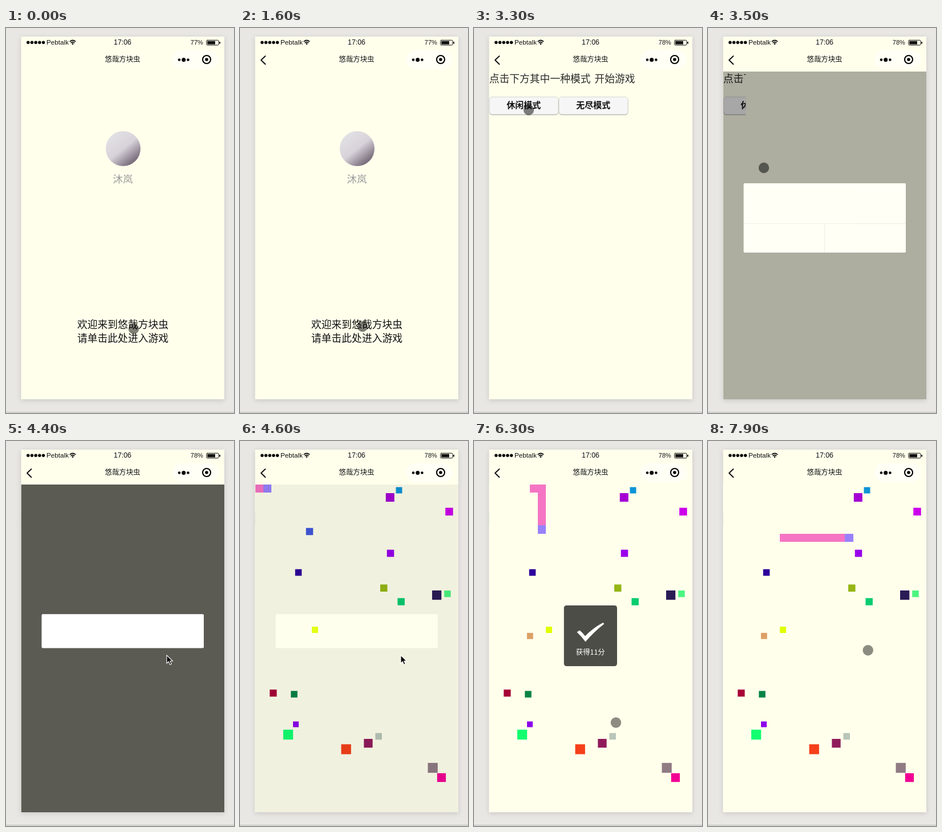
Animation of 400 by 672 pixels, one loop 8000 ms. Source, as an HTML page:

```html
<!DOCTYPE html>
<html lang="zh">
<head>
<meta charset="utf-8">
<title>悠哉方块虫</title>
<style>
  html, body { margin: 0; width: 100%; height: 100%; overflow: hidden; background: #e8e7e4; }
  svg { display: block; width: 400px; height: 672px; }
  text { font-family: "Noto Sans CJK SC", "Noto Sans CJK", sans-serif; fill: #111; }
  .latin { font-family: "Liberation Sans", Arial, sans-serif; }
  .mid { text-anchor: middle; }
  .page { fill: #ffffec; }
  .body { font-size: 17.8px; }
  .prompt { fill: #2b2b28; word-spacing: 3px; }
  .label { font-size: 15px; font-weight: 700; }
  .button { fill: #f6f6f6; stroke: #d0d0cc; stroke-width: .8; filter: drop-shadow(0 1px .6px #0004); }
  .phone { filter: drop-shadow(0 2px 4px #0002); }
  .line { fill: none; stroke: #111; stroke-linecap: round; stroke-linejoin: round; }
  #snake { shape-rendering: crispEdges; }
</style>
</head>
<body>
<svg viewBox="0 0 400 672">
  <defs>
    <clipPath id="screen"><path d="M26.5 76H383V648H26.5Z"/></clipPath>
    <linearGradient id="portrait" x1="0" y1="0" x2=".8" y2="1">
      <stop offset="0" stop-color="#e4e7e8"/>
      <stop offset=".55" stop-color="#d8d2da"/>
      <stop offset="1" stop-color="#655867"/>
    </linearGradient>
  </defs>
  <path d="M0 670.5H400" stroke="#b9b8b5"/>
  <rect class="page phone" x="26.5" y="15" width="356.5" height="633"/>

  <g id="header">
    <g id="signal"></g>
    <text class="latin" x="71" y="28.7" font-size="11.7">Pebtalk</text>
    <g class="line" stroke-width="1.7">
      <path d="M112.3 23.4Q117 19.6 121.7 23.4M114.2 25.7Q117 23.5 119.8 25.7"/>
      <circle cx="117" cy="27.7" r=".6"/>
    </g>
    <text class="latin mid" x="204.5" y="28.7" font-size="12.4">17:06</text>
    <text class="latin" id="charge" x="323.8" y="28.7" font-size="11">77%</text>
    <rect class="line" x="351.8" y="21.3" width="21.2" height="8.6" rx="1.5" stroke-width="1"/>
    <path d="M353.3 22.8H367V28.4H353.3ZM374.2 24H376V27.4H374.2Z" fill="#111"/>
    <text class="mid" x="204.5" y="59" font-size="12.4">悠哉方块虫</text>
    <rect x="292" y="39" width="81" height="32" rx="16" fill="#fff" opacity=".55"/>
    <circle cx="304" cy="55.5" r="2.3"/><circle cx="311.7" cy="55.5" r="3.5"/><circle cx="319.4" cy="55.5" r="2.3"/>
    <circle cx="352" cy="55" r="7" fill="none" stroke="#000" stroke-width="2.1"/><circle cx="352" cy="55" r="2.8"/>
    <path class="line" id="back" d="M44.4 49L37 56L44.4 63.2" stroke-width="1.9"/>
  </g>

  <g clip-path="url(#screen)">
    <g id="welcome">
      <circle cx="205.5" cy="210.5" r="30.5" fill="url(#portrait)"/>
      <text class="mid" x="205" y="270" font-size="17.5" style="fill:#999">沐岚</text>
      <text class="body mid" x="205" y="523.5">欢迎来到悠哉方块虫</text>
      <text class="body mid" x="205" y="548">请单击此处进入游戏</text>
    </g>
    <g id="modes">
      <path class="page" d="M26.5 76H383V648H26.5Z"/>
      <text class="body prompt" x="26.7" y="95">点击下方其中一种模式 开始游戏</text>
      <rect class="button" id="casual" x="27" y="120.3" width="121" height="30.5" rx="5"/>
      <rect class="button" x="149" y="120.3" width="121" height="30.5" rx="5"/>
      <text class="label mid" x="87.2" y="140">休闲模式</text>
      <text class="label mid" x="209.2" y="140">无尽模式</text>
    </g>
    <g id="game">
      <path class="page" d="M26.5 76H383V648H26.5Z"/>
      <g id="board"><g id="foods"></g><g id="snake"></g></g>
    </g>
    <g id="dialog">
      <path id="shade" fill="#000" fill-rule="evenodd" opacity=".645"/>
      <rect id="panel" x="62.5" width="284.5" rx="2.5" fill="#fff"/>
      <path id="footer" d="M62.5 341.5H347M204.5 341.5V392" stroke="#ddd"/>
    </g>
    <g id="toast">
      <rect x="157.8" y="287" width="93.2" height="106" rx="4.5" fill="#4d4d47"/>
      <path d="M180.5 333.5L185.5 330.5Q191 335 195 340.5Q209 326 226.5 317L228.3 319.2Q211 332.5 195.5 350.5Q188.5 341 180.5 333.5Z" fill="#fff"/>
      <text class="mid" x="204.3" y="373" font-size="12.4" style="fill:#fff">获得11分</text>
    </g>
  </g>

  <circle id="touch" r="9.2" fill="#000"/>
  <path id="arrow" d="M0 0V14L3.3 11L5.6 16.3L8.2 15.2L5.9 10H10.4Z" stroke="#fff" stroke-width="1.1"/>
</svg>

<script>
const LOOP = 8000, TICK = 100;
const CELL = 14.25, LEFT = 26.5, TOP = 76;
const STEP = 500 / 3, FIRST_STEP = 4550, EAT_STEP = 10;

const el = Object.fromEntries([...document.querySelectorAll('[id]')].map(n => [n.id, n]));
const clamp = v => Math.max(0, Math.min(1, v));
const easeOut = v => 1 - (1 - clamp(v)) ** 2;
const set = (node, attrs) => { for (const k in attrs) node.setAttribute(k, attrs[k]); };
const show = (node, on) => { node.style.display = on ? '' : 'none'; };
const move = (node, x, y = 0) => set(node, { transform: `translate(${x} ${y})` });

function add(parent, tag, attrs) {
  const node = document.createElementNS('http://www.w3.org/2000/svg', tag);
  set(node, attrs);
  return parent.appendChild(node);
}

function square(parent, x, y, size, fill) {
  return add(parent, 'rect', { x: x - size / 2, y: y - size / 2, width: size, height: size, fill });
}

for (let i = 0; i < 5; i++) add(el.signal, 'circle', { cx: 38.8 + i * 6.7, cy: 25.3, r: 2.7 });

// centre x, centre y, size, colour
[
  [263.3, 98.5, 15, '#a400d3'], [279, 86, 11, '#0e94d6'], [367, 123.3, 13.5, '#cc00eb'],
  [264, 196, 12.5, '#9900eb'], [102.5, 229.5, 11.5, '#2e009b'], [252.3, 256.7, 12.5, '#95b615'],
  [282.7, 280.5, 12.5, '#0acc70'], [345.2, 269, 16.3, '#2a1b55'], [364, 266.7, 11.5, '#4bf580'],
  [131.5, 329.6, 11, '#e1ff00'], [58.3, 440, 12.3, '#a80036'], [95, 442, 11.5, '#078445'],
  [98, 494.5, 10, '#8c00eb'], [84.5, 512.5, 17.3, '#12ff70'], [186.2, 538, 17.3, '#f5401a'],
  [225, 527.6, 15.3, '#901b5b'], [243.2, 515.5, 11.5, '#b8c5b8'], [338.2, 570.5, 17.3, '#907b84'],
  [353.5, 587.5, 15.3, '#f20094']
].forEach(food => square(el.foods, ...food));
const eaten = square(el.foods, 122, 158, 12.5, '#4157dc');
const spawned = square(el.foods, 98.3, 340.3, 10.8, '#dca066');

const segments = Array.from({ length: 9 }, (_, i) =>
  add(el.snake, 'rect', { width: CELL, height: CELL, fill: i ? '#f574c4' : '#9782fb' }));

// Right along the top, down one column, then right again.
function cellAt(n) {
  if (n <= 5) return [n + 1, 0];
  if (n <= 11) return [6, n - 5];
  return [n - 5, 6];
}

const pointer = [
  [0, 224, 525], [200, 224, 525], [400, 215, 521], [1800, 215, 521],
  [2300, 150, 207], [2400, 150, 207], [2900, 96, 143], [3400, 96, 143],
  [3600, 100, 345], [3700, 100, 345], [4200, 282, 374], [4700, 282, 374],
  [5200, 255, 410], [5700, 249, 491.5], [6300, 249, 491.5], [6400, 300, 504],
  [6500, 343, 504], [6600, 346, 475], [6700, 346, 475], [7400, 281, 374],
  [7500, 281, 374], [7900, 280.7, 365.3], [8000, 280.7, 365.3]
];

function pointerAt(t) {
  const i = pointer.findIndex(p => p[0] > t);
  const [t0, x0, y0] = pointer[i - 1], [t1, x1, y1] = pointer[i];
  const k = (t - t0) / (t1 - t0);
  return [x0 + (x1 - x0) * k, y0 + (y1 - y0) * k];
}

function drawDialog(t) {
  show(el.dialog, t >= 3500 && t < 4700);
  const closing = t >= 4400;
  const opacity = closing ? [1, .45, .085][(t - 4400) / TICK] ?? 0 : t < 3600 ? .5 : 1;
  const y = closing ? 302.3 : 271, height = closing ? 59.2 : 121;
  set(el.panel, { y, height });
  set(el.shade, { d: `M26.5 76H383V648H26.5ZM63 ${y + .5}H346.5V${y + height - .5}H63Z` });
  set(el.dialog, { opacity });
  show(el.footer, !closing);
}

function drawGame(t) {
  const step = Math.floor((t - FIRST_STEP) / STEP);
  const length = 7 + Math.max(0, Math.min(2, step - EAT_STEP));
  show(el.board, t >= 4500);
  show(eaten, step < EAT_STEP);
  show(spawned, step >= EAT_STEP);
  segments.forEach((segment, i) => {
    const [col, row] = cellAt(step - i);
    move(segment, LEFT + col * CELL, TOP + row * CELL);
    show(segment, i < length && col >= 0);
  });
  show(el.toast, t >= 6300 && t < 7300);
}

function render(t) {
  show(el.back, t >= 1600);
  el.charge.textContent = t < 2700 ? '77%' : '78%';

  const width = 356.5;
  show(el.modes, t >= 1800);
  show(el.game, t >= 3400);
  move(el.modes, width * (1 - easeOut((t - 1700) / 500)));
  move(el.game, width * (1 - easeOut((t - 3300) / 300)));
  el.casual.style.fill = t >= 3100 && t < 3300 ? '#dedede' : '';

  drawDialog(t);
  drawGame(t);

  const isArrow = t >= 3600 && t < 4700;
  const at = pointerAt(t);
  show(el.arrow, isArrow);
  show(el.touch, !isArrow);
  set(el.touch, { opacity: t < 3600 ? .5 : .45 });
  move(el.arrow, ...at);
  move(el.touch, ...at);
}

const start = performance.now();
function frame() {
  const t = (performance.now() - start) % LOOP;
  render(Math.floor(t / TICK) * TICK);
  requestAnimationFrame(frame);
}
frame();
</script>
</body>
</html>
```
